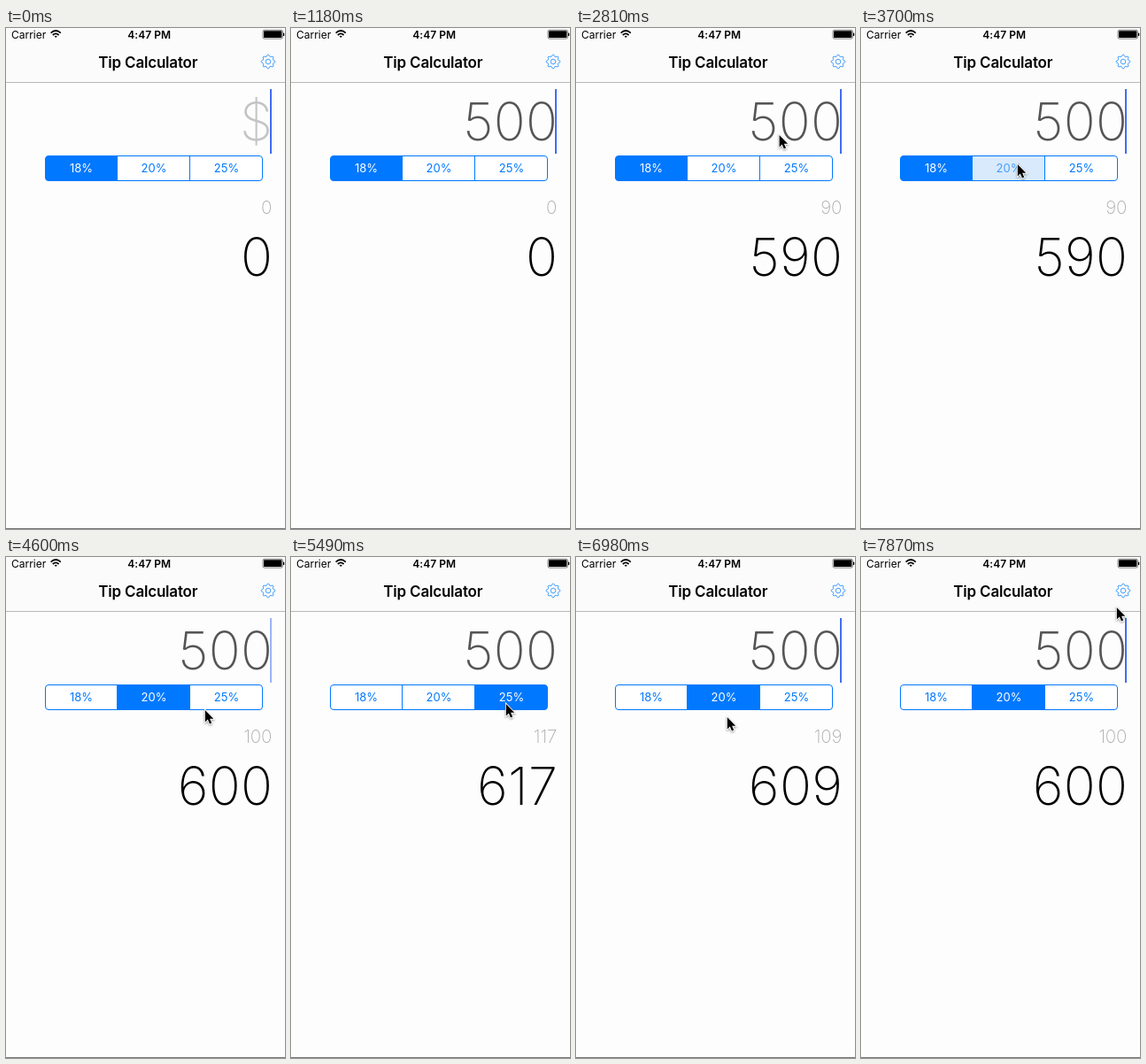
Recreate the animation shown at these times as an HTML page. Size 315 by 566 pixels, loop 8 s.

```html
<!DOCTYPE html>
<html lang="en">
<head>
<meta charset="utf-8">
<title>Tip Calculator</title>
<style>
  html, body { margin: 0; width: 100%; height: 100%; overflow: hidden; background: #fdfdfd; }
  svg { display: block; width: 315px; height: 566px; font-family: Inter, "Liberation Sans", sans-serif; }
  .big { font-size: 59.5px; font-weight: 200; letter-spacing: .4px; text-anchor: end; }
  .small { font-size: 20.5px; font-weight: 200; letter-spacing: -.2px; text-anchor: end; fill: #acacac; }
  .label { font-size: 13px; text-anchor: middle; }
  #pointer { filter: drop-shadow(0 1px .8px #0006); }
</style>
</head>
<body>
<svg viewBox="0 0 315 566">
  <rect width="315" height="566" fill="#fdfdfd"/>
  <rect width="315" height="61" fill="#fbfbfb"/>
  <rect y="61" width="315" height="1" fill="#b8b8b8"/>
  <rect y="565" width="315" height="1" fill="#777"/>

  <text x="6" y="11.5" font-size="12">Carrier</text>
  <g fill="none" stroke="#000" stroke-width="1.7">
    <path d="M50.6 5.6Q56.2 .4 61.8 5.6M52.8 8Q56.2 4.9 59.6 8"/>
    <path d="M54.6 9.3Q56.2 8 57.8 9.3L56.2 11Z" fill="#000" stroke="none"/>
  </g>
  <text x="161.7" y="11.5" font-size="12" font-weight="600" letter-spacing=".05" text-anchor="middle">4:47 PM</text>
  <rect x="290" y="2.3" width="22.4" height="9.8" rx="1.8" fill="none" stroke="#000" stroke-width=".5"/>
  <rect x="291" y="3.3" width="20.4" height="7.8" rx=".8"/>
  <rect x="313" y="5.5" width="1.2" height="3.5" rx=".6"/>

  <text x="160.3" y="45" font-size="17" font-weight="600" letter-spacing="-.2" text-anchor="middle">Tip Calculator</text>
  <g transform="translate(296 38)" fill="none" stroke="#3496ff" stroke-width=".9">
    <path id="gear" stroke-linejoin="round"/>
    <circle r="2.8"/>
  </g>

  <text id="bill" class="big" x="301.4" y="127.4"></text>
  <rect id="caret" x="298" y="69" width="2" height="73" fill="#426bf2"/>
  <g id="segments"></g>
  <rect x="44.5" y="144.5" width="245" height="28" rx="3.5" fill="none" stroke="#0078ff"/>
  <path d="M125.5 144V173M207.5 144V173" stroke="#0078ff"/>
  <text id="tip" class="small" x="300.2" y="209.5"></text>
  <text id="total" class="big" x="301.4" y="279.5"></text>
  <path id="pointer" d="M.8 1V14.4L3.8 11.6L6 16.5L8.2 15.5L6.1 10.8H10.3Z" stroke="#fff" stroke-width="1.8" paint-order="stroke"/>
</svg>
<script>
const LOOP = 8000;
const $ = id => document.getElementById(id);
const clamp = v => Math.max(0, Math.min(1, v));
const BLUE = '#0078ff';

// Each new amount or rate restarts a one-second count to the new tip.
const counts = [
  [860, 5, .18], [1100, 50, .18], [1176, 500, .18],
  [3800, 500, .20], [4923, 500, .25], [6430, 500, .20]
];
// Time from press, time of release, segment.
const taps = [[3500, 3800, 1], [4760, 4923, 2], [6260, 6430, 1]];
const pointerPath = [
  [2740, 232, 118], [3230, 176, 153], [4150, 176, 153], [4600, 224, 172],
  [4800, 242, 165], [6010, 242, 165], [6240, 170, 160], [6500, 170, 160],
  [6800, 170, 180], [7200, 170, 180], [7850, 288, 56]
];

const cubicInOut = p => p < .5 ? 4 * p ** 3 : 1 - (2 - 2 * p) ** 3 / 2;
const smooth = p => p * p * (3 - 2 * p);

function countedValues(t) {
  let tip = 0, total = 0;
  counts.forEach(([start, bill, rate], i) => {
    if (t < start) return;
    const end = Math.min(t, i + 1 < counts.length ? counts[i + 1][0] : LOOP);
    const k = cubicInOut(clamp((end - start) / 1000));
    tip += (bill * rate - tip) * k;
    total += (bill * (1 + rate) - total) * k;
  });
  return [tip, total];
}

function caretOpacity(t) {
  if (t >= 860 && t < 2230) return 1;
  const phase = t < 860 ? t - 100 : (t - 2230) % 950;
  return phase < 250 ? 1 - clamp(phase / 70) : clamp((phase - 420) / 100);
}

function pointerAt(t) {
  const next = pointerPath.findIndex(k => k[0] > t);
  if (next < 0) return pointerPath.at(-1).slice(1);
  const [t0, x0, y0] = pointerPath[next - 1], [t1, x1, y1] = pointerPath[next];
  const k = smooth((t - t0) / (t1 - t0));
  return [x0 + (x1 - x0) * k, y0 + (y1 - y0) * k];
}

// Gear with eight flat teeth.
$('gear').setAttribute('d', 'M' + Array.from({ length: 32 }, (_, i) => {
  const a = (i - 1.5) * Math.PI / 16;
  const r = i % 4 === 1 || i % 4 === 2 ? 7.8 : 6;
  return (r * Math.cos(a)).toFixed(2) + ' ' + (r * Math.sin(a)).toFixed(2);
}).join('L') + 'Z');

$('segments').innerHTML = [
  ['18%', 85, 'M125.5 144.5H48Q44.5 144.5 44.5 148V169Q44.5 172.5 48 172.5H125.5Z'],
  ['20%', 167, 'M125.5 144.5H207.5V172.5H125.5Z'],
  ['25%', 249, 'M207.5 144.5H286Q289.5 144.5 289.5 148V169Q289.5 172.5 286 172.5H207.5Z']
].map(([name, x, d]) => `<path d="${d}"/><text class="label" x="${x}" y="163">${name}</text>`).join('');
const fills = [...$('segments').querySelectorAll('path')];
const labels = [...$('segments').querySelectorAll('text')];

function draw(t) {
  const bill = counts.filter(c => c[0] <= t).at(-1)?.[1];
  $('bill').textContent = bill ?? '$';
  $('bill').setAttribute('fill', bill ? '#555' : '#c4c4c6');
  $('caret').setAttribute('opacity', caretOpacity(t));

  const [tip, total] = countedValues(t);
  $('tip').textContent = Math.round(tip);
  $('total').textContent = Math.round(total);

  const selected = taps.filter(p => p[1] <= t).at(-1)?.[2] ?? 0;
  const pressed = taps.find(p => t >= p[0] && t < p[1])?.[2];
  fills.forEach((fill, i) => {
    fill.setAttribute('fill', i === selected ? BLUE : i === pressed ? '#d9eafc' : '#fff');
    labels[i].setAttribute('fill', i === selected ? '#fff' : i === pressed ? '#45a0fb' : BLUE);
  });

  const shown = t >= pointerPath[0][0];
  $('pointer').style.display = shown ? '' : 'none';
  if (shown) $('pointer').setAttribute('transform', `translate(${pointerAt(t)})`);
}

const startTime = performance.now();
function tick() {
  draw((performance.now() - startTime) % LOOP);
  requestAnimationFrame(tick);
}
tick();
</script>
</body>
</html>
```
